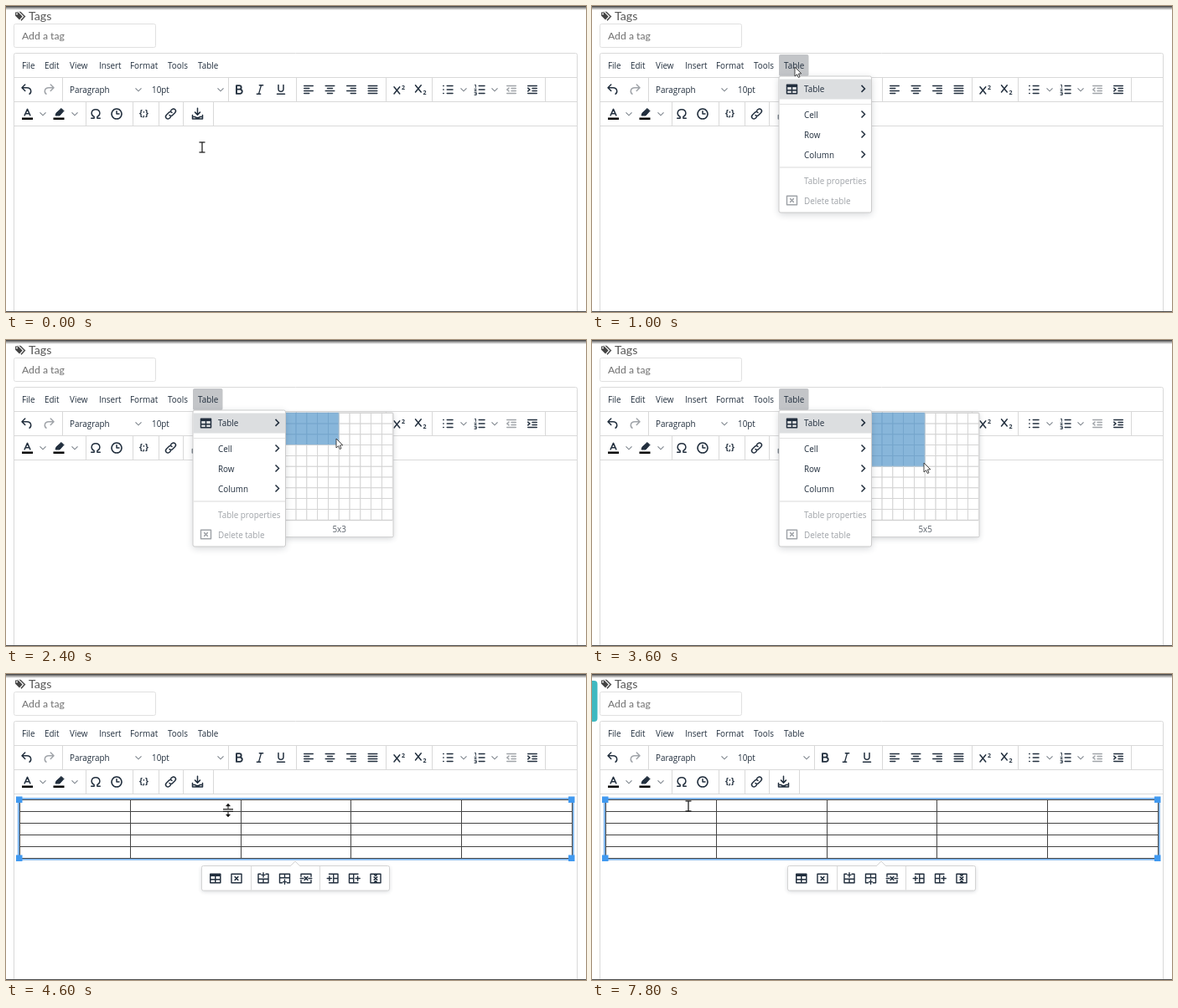
Recreate the animation shown at these times as an HTML page with a canvas. Size 692x366 px, loop 8 s.

```html
<!DOCTYPE html>
<html lang="en">
<head>
<meta charset="utf-8">
<title>Insert a table</title>
<style>
html, body { margin: 0; width: 100%; height: 100%; overflow: hidden; background: #fff; }
canvas { display: block; width: 692px; height: 366px; }
</style>
</head>
<body>
<canvas id="stage" width="692" height="366"></canvas>
<script>
const ctx = document.getElementById('stage').getContext('2d');
const LOOP = 8000, STEP = 200;
const INK = '#222f3e', GREY = '#a0a4a9', LINE = '#d9d9d9', BLUE = '#4099f0';
const UI = '"Open Sans", "Noto Sans", sans-serif';
const GRID = { x: 333.2, y: 87.2, cell: 12.8, n: 10 };
const MENUS = { File: 19, Edit: 46, View: 76, Insert: 111, Format: 148, Tools: 193, Table: 229 };

// Outline icons on a 24 unit grid
const ICONS = {
  undo: 'M9 4L4 9l5 5M4.500 9H12c7.500 0 7.500 8 4 10',
  redo: 'M15 4l5 5-5 5M19.500 9H12c-7.500 0-7.500 8-4 10',
  bold: 'M8 5.500h4.500a3 3 0 0 1 0 6H8zM8 11.500h5.500a3.500 3.500 0 0 1 0 7H8z',
  italic: 'M11 5h6M7 19h6M14 5l-4 14',
  underline: 'M8 4.500v6c0 6 8 6 8 0v-6M6 19h12',
  left: 'M5 6h14M5 10h8M5 14h14M5 18h8',
  center: 'M5 6h14M8 10h8M5 14h14M8 18h8',
  right: 'M5 6h14M11 10h8M5 14h14M11 18h8',
  justify: 'M5 6h14M5 10h14M5 14h14M5 18h14',
  cross: 'M4 7l9 11M13 7L4 18',
  bullets: 'M11 6h9M11 12h9M11 18h9M5 6h.5M5 12h.5M5 18h.5',
  numbers: 'M11 6h9M11 12h9M11 18h9',
  digits: 'M4.500 4.500H6v4M4 11h3l-3 3h3M4 16.500h3v4H4M5 18.500h2',
  outdent: 'M5 6h14M12 10h7M12 14h7M5 18h14M8 9.500L5 12l3 2.500',
  indent: 'M5 6h14M12 10h7M12 14h7M5 18h14M5 9.500L8 12l-3 2.500',
  letter: 'M7.500 14.500L12 4.500l4.500 10M9.200 11.500h5.600',
  omega: 'M5 19h4.500v-2.500C3 13 5 5 12 5s9 8 2.500 11.500V19H19',
  clock: 'M12 4a8 8 0 1 0 .01 0zM12 7.500V12h4',
  link: 'M10 14c1.500 1.500 3.500 1.500 5 0l4-4c3-3.500-1.500-8-5-5l-2 2M14 10c-1.500-1.500-3.500-1.500-5 0l-4 4c-3 3.500 1.500 8 5 5l2-2',
  save: 'M12 3v10M8 9.500l4 4 4-4M4 14v6h16v-6M4 16.500h4l1.500 1.500h5l1.500-1.500h4',
  box: 'M4 5h16v14H4z',
  table: 'M4 5h16v14H4zM4 7h16M4 13.500h16M12 7v12',
  remove: 'M4 5h16v14H4zM9.500 9.500l5 5M14.500 9.500l-5 5',
  rowAbove: 'M8 5H4v14h16V5h-4M4 13h16M12 13v6M12 3v7M9.500 6.500h5',
  rowBelow: 'M8 19H4V5h16v14h-4M4 11h16M12 5v6M12 14v7M9.500 17.500h5',
  rowDelete: 'M4 9V5h16v4M4 15v4h16v-4M3 12h5M16 12h5M9.500 9.500l5 5M14.500 9.500l-5 5',
  colBefore: 'M6 5h14v14H6M13 5v14M13 12h7M3 12h7M6.500 8.500v7',
  colAfter: 'M18 5H4v14h14M11 5v14M4 12h7M14 12h7M17.500 8.500v7',
  colDelete: 'M4 5h16v14H4zM10 6l2 2 2-2M10 18l2-2 2 2M9.500 9.800l5 4.400M14.500 9.800l-5 4.400'
};
const paths = {};
for (const k in ICONS) paths[k] = new Path2D(ICONS[k]);

function icon(name, x, y, color = INK, width = 2) {
  ctx.save();
  ctx.translate(x - 9, y - 9);
  ctx.scale(0.75, 0.75);
  ctx.strokeStyle = color;
  ctx.lineWidth = width;
  ctx.lineCap = ctx.lineJoin = 'round';
  ctx.stroke(paths[name]);
  ctx.restore();
}

function text(s, x, y, color = INK, font = '9.9px ' + UI, align = 'left') {
  ctx.font = font;
  ctx.fillStyle = color;
  ctx.textAlign = align;
  ctx.fillText(s, x, y + 3.6);
}

function rect(x, y, w, h, color) {
  ctx.fillStyle = color;
  ctx.fillRect(x, y, w, h);
}

function poly(points, color, width, fill, close) {
  ctx.beginPath();
  points.forEach(([x, y]) => ctx.lineTo(x, y));
  if (close) ctx.closePath();
  if (fill) { ctx.fillStyle = fill; ctx.fill(); }
  ctx.strokeStyle = color;
  ctx.lineWidth = width;
  ctx.stroke();
}

function panel(x, y, w, h, r, border, shadow) {
  ctx.save();
  ctx.beginPath();
  ctx.roundRect(x, y, w, h, r);
  if (shadow) {
    ctx.shadowColor = 'rgba(34,47,62,.2)';
    ctx.shadowBlur = shadow;
    ctx.shadowOffsetY = shadow / 4;
  }
  ctx.fillStyle = '#fff';
  ctx.fill();
  ctx.restore();
  ctx.strokeStyle = border;
  ctx.lineWidth = 1;
  ctx.stroke();
}

const hline = (x, y, w, color = LINE) => rect(x, y, w, 1, color);
const vline = (x, y, h, color = LINE) => rect(x, y, 1, h, color);
const down = (x, y) => poly([[x - 3.5, y - 1.7], [x, y + 1.8], [x + 3.5, y - 1.7]], '#7b828a', 1.1);
const next = (x, y) => poly([[x - 2, y - 4], [x + 2, y], [x - 2, y + 4]], INK, 1.5);

function drawHeader() {
  const shade = ctx.createLinearGradient(0, 0, 0, 5);
  shade.addColorStop(0, '#333');
  shade.addColorStop(0.35, '#888');
  shade.addColorStop(1, '#fff');
  rect(0, 0, 692, 5, shade);

  const tag = [[0, 0], [4.5, 0], [10, 5.5], [5.5, 10.5], [0, 5]];
  const at = (dx) => tag.map(([x, y]) => [x + dx, y + 7]);
  poly(at(13), '#444', 0.5, '#444', true);
  poly(at(10.5), '#fff', 1.2, '#444', true);
  ctx.beginPath();
  ctx.arc(13, 9.5, 1, 0, 7);
  ctx.fillStyle = '#fff';
  ctx.fill();
  text('Tags', 27, 13.2, '#555', '14.2px Lato, sans-serif');
  panel(9.5, 21.5, 169, 28, 2, '#e0e0e0');
  text('Add a tag', 19, 36.8, '#707070', '12.2px Lato, sans-serif');
}

function drawToolbar(open) {
  panel(9.5, 56.5, 672, 330, 2, LINE);
  [85, 114, 143].forEach(y => hline(10, y, 671));
  if (open) {
    ctx.beginPath();
    ctx.roundRect(223, 58, 35.5, 26, 2);
    ctx.fillStyle = '#c3c5c8';
    ctx.fill();
  }
  for (const m in MENUS) text(m, MENUS[m], 71.3);

  [67, 265, 346, 453, 508, 643].forEach(x => vline(x, 86, 28));
  [95, 151, 182, 211, 247].forEach(x => vline(x, 115, 28));
  const y = 100, y2 = 129;
  icon('undo', 25, y);
  icon('redo', 51, y, GREY);
  text('Paragraph', 76, y + 0.3);
  text('10pt', 174, y + 0.3);
  [158, 256, 546, 583].forEach(x => down(x, y));
  icon('bold', 278, y, INK, 2.5);
  icon('italic', 303, y, INK, 1.7);
  icon('underline', 328, y);
  ['left', 'center', 'right', 'justify'].forEach((n, i) => icon(n, 361 + i * 25.5, y));
  icon('cross', 469, y + 0.5);
  text('2', 472, 96, INK, 'bold 7px ' + UI);
  icon('cross', 494.5, y - 1.5);
  text('2', 497.5, 102, INK, 'bold 7px ' + UI);
  icon('bullets', 527, y);
  icon('numbers', 565, y);
  icon('digits', 565, y, INK, 1.2);
  icon('outdent', 603, y, GREY);
  icon('indent', 628, y);

  icon('letter', 25.5, y2);
  rect(19, 133.5, 13, 2.5, '#000');
  poly([[59, 131], [60, 128], [66, 122.5], [69, 125.5], [64, 131]], INK, 1, INK, true);
  rect(56.5, 133.5, 13, 2.5, '#000');
  down(44, y2);
  down(82, y2);
  icon('omega', 107, y2);
  icon('clock', 132, y2);
  text('{;}', 164.5, y2 - 0.3, INK, 'bold 10px ' + UI, 'center');
  icon('link', 196.5, y2);
  icon('save', 228.5, y2);
}

function drawMenu() {
  panel(223, 84, 110.5, 163, 2, '#ccc', 9);
  rect(223.5, 87.5, 109.5, 24, '#dcdee0');
  tableIcon(238.5, 99.5);
  ['Table', 'Cell', 'Row', 'Column'].forEach((s, i) => {
    const y = i ? 106.3 + i * 24 : 99.7;
    text(s, 253, y);
    next(323.5, y - 0.8);
  });
  hline(224, 117, 109, '#e2e2e2');
  hline(224, 192.5, 109, LINE);
  text('Table properties', 253, 209, GREY);
  icon('remove', 238.5, 232.5, GREY);
  text('Delete table', 253, 233, GREY);
}

function tableIcon(x, y) {
  icon('table', x, y);
  rect(x - 6, y - 5, 12, 2.5, INK);
}

function drawGrid(cols, rows) {
  const { x, y, cell, n } = GRID, size = cell * n;
  panel(x, y, 128.8, 148.5, 1, '#ccc', 7);
  rect(x, y, cols * cell, rows * cell, '#88b6da');
  ctx.lineWidth = 0.8;
  for (let r = 0; r < n; r++)
    for (let c = 0; c < n; c++) {
      ctx.strokeStyle = c < cols && r < rows ? '#76a6cc' : '#d4d4d4';
      ctx.strokeRect(x + c * cell, y + r * cell, cell, cell);
    }
  hline(x, y + size, size, '#ccc');
  text(cols + 'x' + rows, x + size / 2 + 0.5, 226, '#596069', '9.9px ' + UI, 'center');
}

function drawTable(caret) {
  const x = 16, y = 150, w = 659, h = 70;
  ctx.strokeStyle = '#80b6ee';
  ctx.lineWidth = 2.4;
  ctx.strokeRect(x - 1, y - 0.8, w + 2.6, h + 2.4);
  for (let i = 0; i < 6; i++) {
    hline(x, y + i * 14, w + 1, '#444');
    vline(Math.round(x + i * w / 5), y, h + 1, '#444');
  }
  for (const px of [x, x + w]) for (const py of [y, y + h]) rect(px - 4, py - 3.5, 7.5, 7.5, BLUE);
  if (caret) vline(17, 152, 11, '#222');

  panel(233.5, 229.5, 224, 29.5, 2, '#d4d4d4', 5);
  poly([[339, 230], [345, 224], [351, 230]], '#d4d4d4', 1, '#fff');
  vline(292, 230, 28.5);
  vline(374, 230, 28.5);
  tableIcon(249.8, 244.5);
  const tools = { remove: 275, rowAbove: 307, rowBelow: 332.5, rowDelete: 358, colBefore: 390, colAfter: 415.5, colDelete: 441 };
  for (const n in tools) icon(n, tools[n], 244.5, INK, 1.9);
}

const CURSORS = {
  beam(x, y) {
    poly([[x, y - 6], [x, y + 6]], '#111', 1.2);
    for (const d of [-6, 6]) poly([[x - 3.5, y + d], [x + 3.5, y + d]], '#111', 1.2);
  },
  arrow(x, y) {
    const tip = [[0, 0], [0, 11], [2.6, 8.7], [4.3, 12.5], [6, 11.7], [4.4, 8], [7.8, 7.8]];
    poly(tip.map(([a, b]) => [x + a, y + b]), '#333', 0.9, '#fff', true);
  },
  resize(x, y) {
    rect(x - 6, y - 1.8, 12, 1.2, '#111');
    rect(x - 6, y + 0.8, 12, 1.2, '#111');
    for (const d of [-1, 1]) {
      poly([[x, y + d * 2], [x, y + d * 6]], '#111', 1);
      poly([[x - 2.5, y + d * 5], [x, y + d * 8], [x + 2.5, y + d * 5]], '#111', 0.5, '#111', true);
    }
  }
};

// Pointer stops: time, x, y
const ROUTE = [
  [200, 234, 169], [700, 242, 73], [1300, 242, 73], [1600, 264, 99], [2000, 338, 101],
  [2400, 394, 118], [2600, 394, 118], [3200, 396, 147], [3800, 396, 147],
  [4500, 265, 163], [4800, 265, 163], [5500, 115, 158]
];

function pointer(t) {
  const i = ROUTE.findIndex(p => p[0] > t);
  if (i < 0) return ROUTE[ROUTE.length - 1].slice(1);
  if (i === 0) return ROUTE[0].slice(1);
  const [t0, x0, y0] = ROUTE[i - 1], [t1, x1, y1] = ROUTE[i];
  const u = (t - t0) / (t1 - t0), e = u * u * (3 - 2 * u);
  return [x0 + (x1 - x0) * e, y0 + (y1 - y0) * e];
}

function drawTab(t) {
  const u = Math.max(0, (t - 6800) / 1000);
  if (!u) return;
  ctx.beginPath();
  ctx.roundRect(-20, 8, 20 + 6.5 * u * u, 49, 4);
  ctx.fillStyle = '#3fb9c1';
  ctx.fill();
}

function draw(t) {
  const [x, y] = pointer(t);
  const menu = t >= 800 && t < 3800, inserted = t >= 3800;
  rect(0, 0, 692, 366, '#fff');
  drawHeader();
  drawToolbar(menu);
  if (inserted) {
    const since = t - (t < 5600 ? 3800 : 5600);
    drawTable(Math.floor(since / 600) % 2 === 0);
  }
  if (menu && t >= 1600) {
    const count = (v, from) => Math.max(1, Math.floor((v - from) / GRID.cell) + 1);
    drawGrid(count(x, GRID.x), x > GRID.x ? count(y, GRID.y) : 1);
  }
  if (menu) drawMenu();
  drawTab(t);
  hline(0, 365, 692, '#4a4a4a');
  const resizing = t >= 4400 && t < 4900;
  CURSORS[resizing ? 'resize' : menu || y < 143 ? 'arrow' : 'beam'](x, y);
}

const start = performance.now();
function tick() {
  const t = (performance.now() - start) % LOOP;
  draw(Math.floor(t / STEP) * STEP);
  requestAnimationFrame(tick);
}
tick();
</script>
</body>
</html>
```
